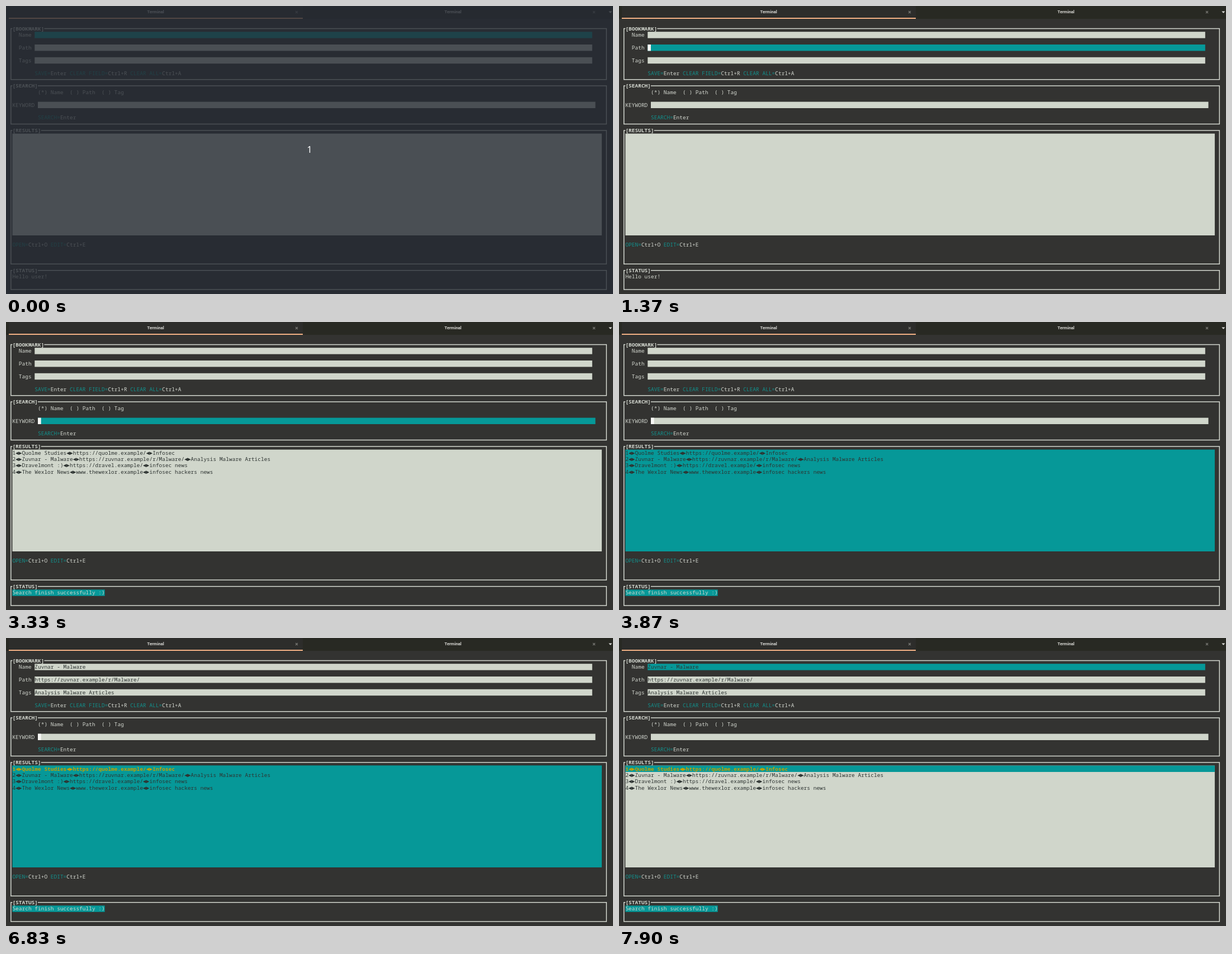
Animation, 1086 px wide and 516 px high, one loop 8000 ms. Source, as an HTML page with a canvas:

```html
<!DOCTYPE html>
<html lang="en">
<head>
<meta charset="utf-8">
<title>Bookmark terminal</title>
<style>
html, body { margin: 0; width: 100%; height: 100%; overflow: hidden; background: #333331; }
canvas { display: block; }
</style>
</head>
<body>
<canvas id="stage" width="1086" height="516"></canvas>
<script>
const ctx = document.getElementById('stage').getContext('2d');
const LOOP = 8000, CW = 5.7, RH = 11.4, TOP = 40.5;
const BG = '#333331', LIGHT = '#d3d7cf', BAR = '#d0d6cb', TEAL = '#069898';
const HINT = '#12918d', DARK = '#2e3432', YELLOW = '#c4a000';
const MONO = '"Noto Sans Mono", "DejaVu Sans Mono", monospace';

const fields = [
  { id: 'name', label: 'Name', row: 1, value: 'Zuvnar - Malware' },
  { id: 'path', label: 'Path', row: 3, value: 'https://zuvnar.example/r/Malware/' },
  { id: 'tags', label: 'Tags', row: 5, value: 'Analysis Malware Articles' },
];
const radios = ['(*) Name', '( ) Path', '( ) Tag'];
const results = [
  ['1', 'Quolme Studies', 'https://quolme.example/', 'Infosec'],
  ['2', ...fields.map(f => f.value)],
  ['3', 'Dravelmont :)', 'https://dravel.example/', 'infosec news'],
  ['4', 'The Wexlor News', 'www.thewexlor.example', 'infosec hackers news'],
].map(parts => parts.join('◄►'));

// Each track holds [start time, value] pairs
const focusTrack = [
  [0, 'name'], [1330, 'path'], [1530, 'tags'], [1670, 'radio0'], [2170, 'radio1'],
  [2530, 'radio2'], [2800, 'keyword'], [3870, 'results'], [7370, 'name'],
];
const KEYWORD = [10, 12];
const cursorTrack = [
  [0, null], [500, [9, 1]], [1130, null], [1370, [9, 3]], [1530, [9, 5]],
  [2800, KEYWORD], [4870, null], [5200, KEYWORD], [5800, null], [6030, KEYWORD],
  [6600, null], [6830, KEYWORD], [7370, [25, 1]], [7900, null],
];
const selectTrack = [[0, -1], [4070, 0], [4300, 1], [6800, 0]];
const at = (track, t) => track.findLast(([start]) => start <= t)[1];

function rect(x, y, w, h, color) {
  ctx.fillStyle = color;
  ctx.fillRect(x, y, w, h);
}

function cells(col, row, cols, rows, color) {
  rect(col * CW, TOP + (row - 0.5) * RH, cols * CW, rows * RH, color);
}

// Terminal text: one glyph per cell
function text(str, col, row, color = LIGHT, bold = false) {
  ctx.font = `${bold ? 'bold ' : ''}9.5px ${MONO}`;
  ctx.textAlign = 'left';
  ctx.fillStyle = color;
  [...str].forEach((ch, i) => ctx.fillText(ch, (col + i) * CW, TOP + row * RH + 3.3));
}

function hints(col, row, ...pairs) {
  for (const [action, key] of pairs) {
    text(action + '=', col, row, HINT);
    col += action.length + 1;
    text(key, col, row);
    col += key.length + 1;
  }
}

function panel(title, top, bottom) {
  const y = TOP + top * RH, end = TOP + bottom * RH, left = 8.8, right = 1074.3;
  ctx.strokeStyle = LIGHT;
  ctx.lineWidth = 1.5;
  ctx.beginPath();
  ctx.moveTo(2 * CW, y);
  ctx.lineTo(left, y);
  ctx.lineTo(left, end);
  ctx.lineTo(right, end);
  ctx.lineTo(right, y);
  ctx.lineTo((2 + title.length) * CW, y);
  ctx.stroke();
  text(title, 2, top, LIGHT, true);
}

function tab(center) {
  ctx.textAlign = 'center';
  ctx.fillStyle = '#d8d8d4';
  ctx.font = 'bold 7.6px Roboto, "Open Sans", sans-serif';
  ctx.fillText('Terminal', center, 13.4);
  const x = center + 252.3, y = 11;
  ctx.strokeStyle = '#777773';
  ctx.lineWidth = 1.2;
  ctx.beginPath();
  ctx.moveTo(x - 2, y - 2);
  ctx.lineTo(x + 2, y + 2);
  ctx.moveTo(x + 2, y - 2);
  ctx.lineTo(x - 2, y + 2);
  ctx.stroke();
}

function tabBar() {
  rect(0, 0, 1086, 23, '#282923');
  rect(5, 0, 526, 23, '#2d2d2b');
  rect(5, 21, 526, 2, '#f2b184');
  tab(267.7);
  tab(799.7);
  ctx.fillStyle = '#e4e4e0';
  ctx.beginPath();
  ctx.moveTo(1078.3, 9.6);
  ctx.lineTo(1084.3, 9.6);
  ctx.lineTo(1081.3, 12.8);
  ctx.fill();
}

function draw(t) {
  const focus = at(focusTrack, t), cursor = at(cursorTrack, t), selected = at(selectTrack, t);
  const found = t >= 3330, loaded = t >= 6000;
  const fill = id => focus === id ? TEAL : BAR;

  rect(0, 0, 1086, 516, BG);
  tabBar();

  panel('[BOOKMARK]', 0, 8);
  for (const { id, label, row, value } of fields) {
    text(label, 4, row);
    cells(9, row, 175, 1, fill(id));
    if (loaded) text(value, 9, row, DARK);
  }
  hints(9, 7, ['SAVE', 'Enter'], ['CLEAR FIELD', 'Ctrl+R'], ['CLEAR ALL', 'Ctrl+A']);

  panel('[SEARCH]', 9, 15);
  radios.forEach((label, i) => {
    const col = 10 + i * 10, active = focus === 'radio' + i;
    if (active) cells(col, 10, 10, 1, TEAL);
    text(label, col, 10, active ? DARK : LIGHT);
  });
  text('KEYWORD', 2, 12);
  cells(10, 12, 175, 1, fill('keyword'));
  hints(10, 14, ['SEARCH', 'Enter']);

  panel('[RESULTS]', 16, 37);
  cells(2, 17, 185, 16, fill('results'));
  if (found) results.forEach((line, i) => {
    const active = i === selected;
    if (active) cells(2, 17 + i, 185, 1, TEAL);
    text(line, 2, 17 + i, active ? YELLOW : DARK, active);
  });
  hints(2, 34, ['OPEN', 'Ctrl+O'], ['EDIT', 'Ctrl+E']);

  panel('[STATUS]', 38, 41);
  const status = found ? 'Search finish successfully :)' : 'Hello user!';
  if (found) cells(2, 39, status.length, 1, TEAL);
  text(status, 2, 39);

  if (cursor) cells(...cursor, 1, 1, '#f6f6f4');

  // Countdown overlay
  if (t < 30) {
    rect(0, 0, 1086, 516, 'rgba(37, 43, 52, 0.785)');
    ctx.fillStyle = '#fff';
    ctx.font = '16px "Noto Sans", "Open Sans", sans-serif';
    ctx.textAlign = 'center';
    ctx.fillText('1', 543, 263);
  }
}

const start = performance.now();
function frame() {
  draw((performance.now() - start) % LOOP);
  requestAnimationFrame(frame);
}
frame();
</script>
</body>
</html>
```
